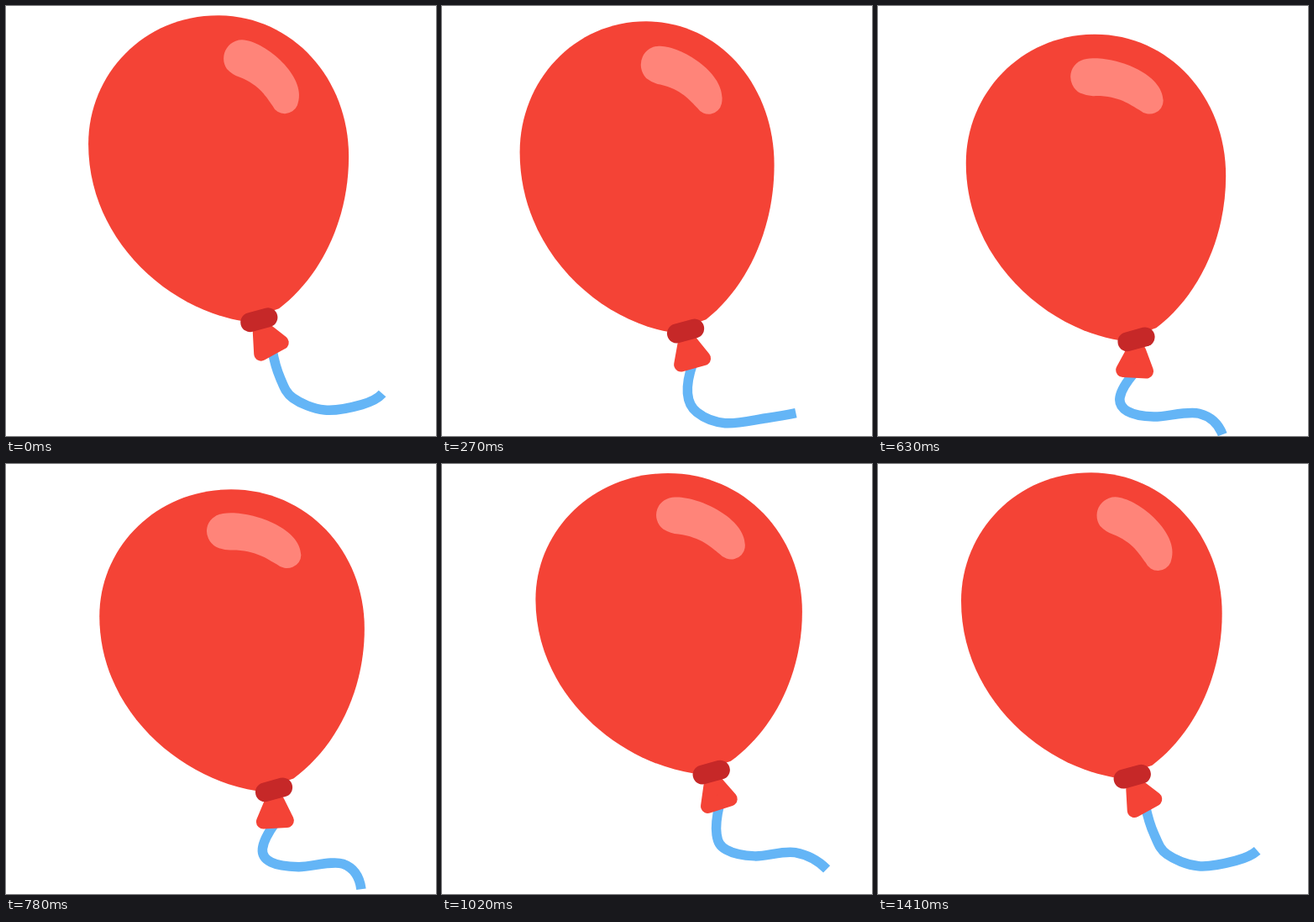
Write an HTML page that moves like this. It is 512x512 px and loops after 1440 ms.

```html
<!DOCTYPE html>
<html lang="en">
<head>
<meta charset="utf-8">
<title>Balloon</title>
<style>
  html, body { margin: 0; width: 100%; height: 100%; overflow: hidden; background: #fff; }
  svg { display: block; width: 100vw; height: 100vh; }
</style>
</head>
<body>
<svg viewBox="0 0 512 512">
  <g id="balloon">
    <path id="string" fill="none" stroke="#64b5f6" stroke-width="11.5"/>
    <path id="flap" d="M-3 8H4L14 31H-14Z" fill="#f44336" stroke="#f44336" stroke-width="17" stroke-linejoin="round"/>
    <g id="body">
      <path fill="#f44336" d="M-49-362C39-362 107-288 107-194C107-120 75-52 24-13L-19 2C-108-12-203-95-203-209C-203-292-137-362-49-362Z"/>
      <path id="shine" fill="#ff8479" d="M-4 21.6A22 22 0 0 1-11-19C12-34 74-38 87-6A16.2 16.2 0 0 1 66 15C54 13 38 8 14 18Q6 22-4 21.6Z"/>
    </g>
    <path d="M-10.4 3.4L10.8-2.4" stroke="#c62828" stroke-width="23" stroke-linecap="round"/>
  </g>
</svg>
<script>
const LOOP = 1440, STEP = 30, DEG = Math.PI / 180;
const { cos, sin } = Math;
const $ = id => document.getElementById(id);
const set = (id, name, value) => $(id).setAttribute(name, value);

// string joints below the knot: rest place, sideways sway, vertical lift, and curl at double speed
const joints = [
  { x: 3.5, y: 72,  sway: 23, lift: 0,   curl: 1 },
  { x: 15,  y: 92,  sway: 26, lift: 4,   curl: 2 },
  { x: 49,  y: 102, sway: 29, lift: 8.5, curl: 3 },
  { x: 98,  y: 97,  sway: 24, lift: 7,   curl: 3 },
  { x: 130, y: 105, sway: 25, lift: -15, curl: -6.5 }
];

// smooth path through points, with natural ends
function curve(pts) {
  const n = pts.length - 1;
  const tan = pts.map((p, i) => i > 0 && i < n
    ? p.map((_, k) => (pts[i + 1][k] - pts[i - 1][k]) / 2) : null);
  tan[0] = pts[0].map((v, k) => 2 * (pts[1][k] - v) - tan[1][k]);
  tan[n] = pts[n].map((v, k) => 2 * (v - pts[n - 1][k]) - tan[n - 1][k]);
  let d = "M" + pts[0];
  for (let i = 0; i < n; i++) {
    const c1 = pts[i].map((v, k) => v + tan[i][k] / 3);
    const c2 = pts[i + 1].map((v, k) => v - tan[i + 1][k] / 3);
    d += `C${c1} ${c2} ${pts[i + 1]}`;
  }
  return d;
}

function draw(t) {
  const a = t / LOOP * 2 * Math.PI;
  // a swing plus a weaker one at double speed
  const wave = (mean, c1, s1, c2, s2) =>
    mean + c1 * cos(a) + s1 * sin(a) + c2 * cos(2 * a) + s2 * sin(2 * a);

  set("balloon", "transform",
    `translate(${wave(306, -6.9, -14.2, 2, 1.5)} ${wave(380, -9.4, 13.6, 2.6, -0.9)})`);

  // squash and stretch
  const sx = wave(310.5, -1.7, -7.3, 1.2, 1) / 310;
  const sy = 1 + 0.75 * (1 - sx);
  set("body", "transform", `translate(${50 * (1 - sx)}) scale(${sx} ${sy})`);

  // the highlight slides around the shoulder and back
  const u = (1 - cos(a + 7.5 * DEG)) / 2;
  const x = -20 - 36 * u, y = -311;
  const dx = 31 - 8 * u - 8 * u * u - x, dy = -261 - 23 * u - y;
  const turn = Math.atan2(dy, dx) / DEG, stretch = Math.hypot(dx, dy) / 72;
  set("shine", "transform", `translate(${x} ${y}) rotate(${turn}) scale(${stretch} 1)`);

  const tilt = wave(-14.2, -14.5, 6.3, 0, -2.1);
  set("flap", "transform", `translate(0 7) rotate(${tilt})`);

  const sway = cos(a + 24 * DEG), lift = cos(a - 17 * DEG);
  const curl = cos(2 * a - 26 * DEG), bob = 2.8 * cos(2 * a - 145 * DEG);
  const root = [-33 * sin(tilt * DEG), 7 + 33 * cos(tilt * DEG)];
  set("string", "d", curve([root, ...joints.map(j => [
    j.x + j.sway * sway + j.curl * curl,
    j.y + j.lift * lift + bob
  ])]));
}

const start = performance.now();
function tick() {
  const t = (performance.now() - start) % LOOP;
  draw(Math.floor(t / STEP) * STEP);
  requestAnimationFrame(tick);
}
tick();
</script>
</body>
</html>
```
